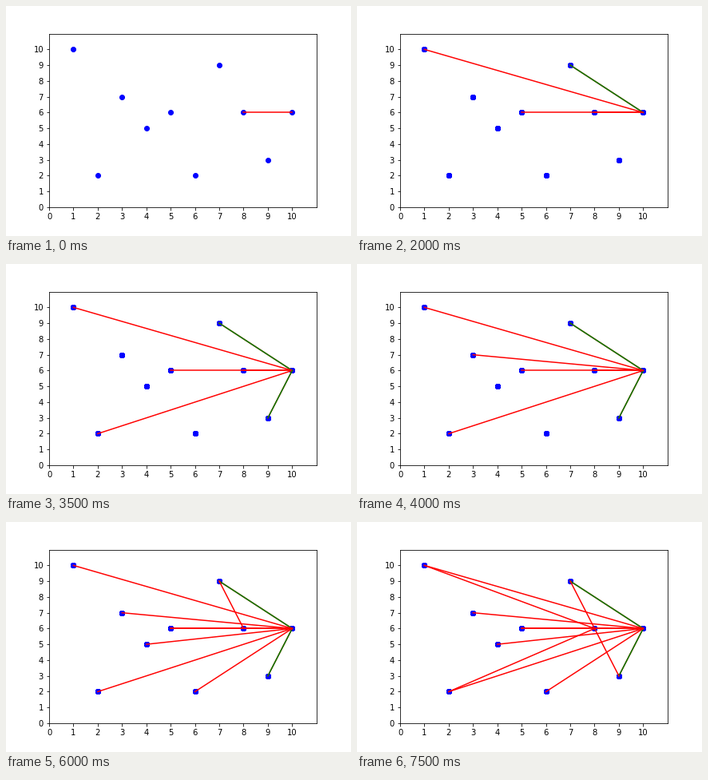
Write a matplotlib script that moves like this. It is 432x288 px and loops after 8000 ms.

```python
import itertools

import matplotlib.pyplot as plt
import numpy as np
from matplotlib.animation import FuncAnimation

STEPS = 16
STEP_MS = 500

# Points in the order in which the brute-force hull search visits them
points = [(10, 6), (8, 6), (5, 6), (7, 9), (1, 10),
          (2, 2), (9, 3), (3, 7), (6, 2), (4, 5)]


def side(a, b, p):
    return (b[0] - a[0]) * (p[1] - a[1]) - (b[1] - a[1]) * (p[0] - a[0])


def is_hull_edge(a, b):
    sides = [side(a, b, p) for p in points if p not in (a, b)]
    return min(sides) > 0 or max(sides) < 0


def search_steps():
    """Each pair is tried in red; a hull edge is then confirmed in green."""
    for a, b in itertools.combinations(points, 2):
        yield a, b, "r"
        if is_hull_edge(a, b):
            yield a, b, "g"


fig, ax = plt.subplots(figsize=(6, 4), dpi=72)
fig.subplots_adjust(left=0.125, right=0.9, bottom=0.125, top=0.88)
ax.set(xlim=(0, 11), ylim=(0, 11), xticks=range(11), yticks=range(11))

dots = ax.scatter(*zip(*points), color="b")
lines = [ax.plot((a[0], b[0]), (a[1], b[1]), color=color)[0]
         for a, b, color in itertools.islice(search_steps(), STEPS)]


def update(step):
    # The dots are stamped again at every step, which hardens their edges
    dots.set_offsets(np.tile(points, (step + 1, 1)))
    for i, line in enumerate(lines):
        line.set_visible(i <= step)
    return [dots, *lines]


anim = FuncAnimation(fig, update, frames=STEPS, interval=STEP_MS,
                     init_func=lambda: update(0), repeat=True, repeat_delay=0)
plt.show()
```
